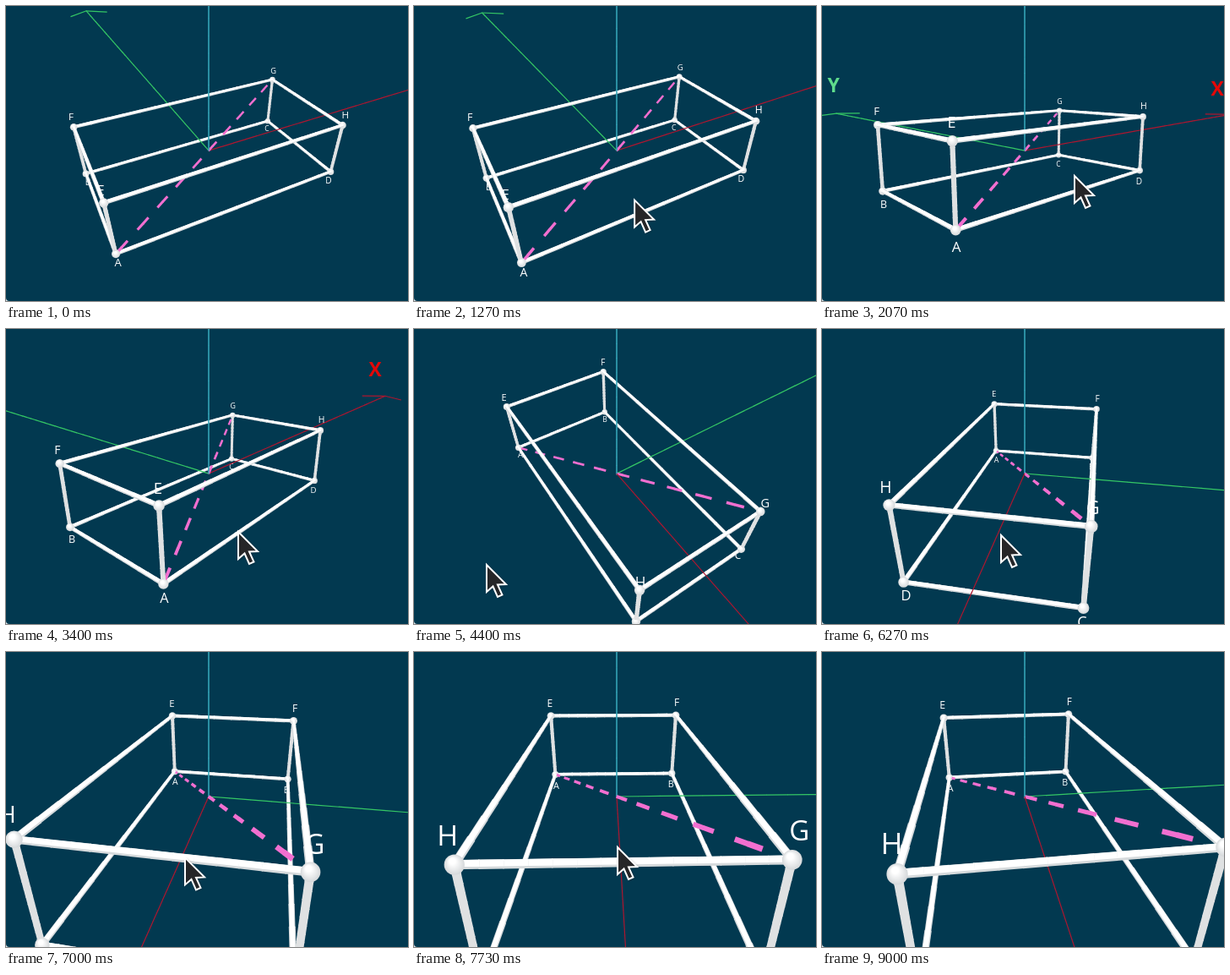
An HTML page with a canvas for the animation above (9.19 s loop, 476x349 px).

```html
<!DOCTYPE html>
<html lang="en">
<head>
<meta charset="utf-8">
<title>Orbiting a cuboid</title>
<style>
html, body { margin: 0; height: 100%; overflow: hidden; background: #023950; }
canvas { display: block; }
</style>
</head>
<body>
<canvas id="stage" width="476" height="349"></canvas>
<script>
const ctx = document.getElementById('stage').getContext('2d');
const LOOP = 9190, START = 730, END = 9000, STEP = (END - START) / 124;
const CX = 240, CY = 171, FOCAL = 425.5;

// time, azimuth, elevation, distance, cursor x, cursor y
const KEYS = [
  [730, 242.7, 36, 6.27, 255, 233],
  [1000, 242.2, 36, 5.96, 257, 232],
  [1600, 237, 32, 5.96, 270, 224],
  [2064, 226.6, 10.7, 5.96, 299, 201],
  [2530, 224, 11.5, 5.96, 297, 206],
  [3398, 220, 21.6, 5.96, 275, 240],
  [3530, 222, 23, 5.96, 270, 243],
  [4398, 326.7, 48.5, 5.95, 86, 279],
  [5330, 372, 34, 5.66, 39, 270],
  [5600, 380, 28, 5.42, 41, 262],
  [6265, 370.9, 25.6, 5.42, 212, 244],
  [6400, 370.9, 25.5, 5.42, 212, 244],
  [7180, 370.5, 24.9, 4.15, 212, 243],
  [7732, 358.6, 24.9, 4.15, 241, 231],
  [8130, 352.2, 24.8, 4.15, 257, 233],
  [8300, 352.1, 24.8, 4.15, 256, 232],
  [9000, 352.1, 24.8, 4.15, 91, 15]
];

const corners = [...'ABCDEFGH'].map((name, i) => ({
  name,
  p: [i % 4 < 2 ? -2 : 2, i % 4 === 1 || i % 4 === 2 ? 1 : -1, i < 4 ? -0.5 : 0.5]
}));

// Monotone cubic interpolation of one key column
function sample(t, col) {
  const last = KEYS.length - 1;
  if (t <= KEYS[0][0]) return KEYS[0][col];
  if (t >= KEYS[last][0]) return KEYS[last][col];
  const i = KEYS.findIndex(k => k[0] > t) - 1;
  const slope = j => j < 0 || j >= last ? 0
    : (KEYS[j + 1][col] - KEYS[j][col]) / (KEYS[j + 1][0] - KEYS[j][0]);
  const tangent = j => {
    const a = slope(j - 1), b = slope(j);
    return a * b <= 0 ? 0 : 2 * a * b / (a + b);
  };
  const h = KEYS[i + 1][0] - KEYS[i][0], u = (t - KEYS[i][0]) / h, v = 1 - u;
  return KEYS[i][col] * (1 + 2 * u) * v * v + KEYS[i + 1][col] * u * u * (3 - 2 * u)
    + h * u * v * (tangent(i) * v - tangent(i + 1) * u);
}

const mix = (a, b, k) => a.map((v, i) => v + (b[i] - v) * k);

function makeCamera(azimuth, elevation, distance) {
  const a = azimuth * Math.PI / 180, e = elevation * Math.PI / 180;
  const sa = Math.sin(a), ca = Math.cos(a), se = Math.sin(e), ce = Math.cos(e);
  const nearness = ([x, y, z]) => (x * ca + y * sa) * ce + z * se;
  const project = p => {
    const [x, y, z] = p, near = nearness(p), s = FOCAL / (distance - near);
    return {
      x: CX + (y * ca - x * sa) * s,
      y: CY + ((x * ca + y * sa) * se - z * ce) * s,
      s, near
    };
  };
  return { project, nearness, distance };
}

function stroke(a, b, width, color, extend = 0, dy = 0) {
  const len = Math.hypot(b.x - a.x, b.y - a.y) || 1;
  const ex = (b.x - a.x) / len * extend, ey = (b.y - a.y) / len * extend;
  ctx.strokeStyle = color;
  ctx.lineWidth = width;
  ctx.beginPath();
  ctx.moveTo(a.x - ex, a.y - ey + dy);
  ctx.lineTo(b.x + ex, b.y + ey + dy);
  ctx.stroke();
}

function drawScene(camera) {
  const items = [];
  const add = (near, draw) => items.push({ near, draw });

  function pieces(from, to, count, draw) {
    for (let i = 0; i < count; i++) {
      const a = camera.project(mix(from, to, i / count));
      const b = camera.project(mix(from, to, (i + 1) / count));
      add((a.near + b.near) / 2, () => draw(a, b));
    }
  }

  function tube(from, to) {
    const upright = from[2] !== to[2];
    pieces(from, to, 14, (a, b) => {
      const w = (a.s + b.s) / 2 * 0.056;
      stroke(a, b, w, upright ? '#dfe1e2' : '#d6dadc', 0.6);
      if (!upright) stroke(a, b, w * 0.72, '#fff', 0.6, -w * 0.12);
    });
  }

  function ball(p) {
    const { x, y, s, near } = camera.project(p), r = s * 0.06;
    add(near + 0.05, () => {
      const shade = ctx.createRadialGradient(x - r * 0.2, y - r * 0.35, r * 0.3, x, y, r);
      shade.addColorStop(0, '#fff');
      shade.addColorStop(1, '#d5d8da');
      ctx.fillStyle = shade;
      ctx.beginPath();
      ctx.arc(x, y, r, 0, 7);
      ctx.fill();
    });
  }

  function label(text, p, size, color, weight) {
    const { x, y, s, near } = camera.project(p);
    if (s <= 0) return;
    add(near, () => {
      const px = s * size;
      ctx.font = `${weight} ${px}px "Open Sans", sans-serif`;
      ctx.fillStyle = color;
      ctx.fillText(text, x, y + px * 0.36);
    });
  }

  function axis(dir, color, width) {
    const near = camera.nearness(dir);
    const length = near > 0 ? Math.min(10, (camera.distance - 0.2) / near) : 10;
    const line = (a, b) => stroke(a, b, width, color, 0.2);
    pieces([0, 0, 0], dir.map(v => v * length), 40, line);
    if (length < 10 || dir[2]) return;
    const tip = dir.map(v => v * 10);
    for (const side of [-0.65, 0.65]) {
      pieces(tip, [dir[0] * 9.5 + dir[1] * side, dir[1] * 9.5 + dir[0] * side, 0], 1, line);
    }
  }

  axis([1, 0, 0], '#ad1730', 1.2);
  axis([0, 1, 0], '#35c765', 1.2);
  axis([0, 0, 1], '#35a5b8', 1.6);
  label('X', [10, 0.5, 0.9], 0.7, '#e30808', 'bold');
  label('Y', [0, 10, 1], 0.7, '#5fdc8c', 'bold');

  for (let i = 0; i < 4; i++) {
    const j = (i + 1) % 4;
    for (const [m, n] of [[i, j], [i + 4, j + 4], [i, i + 4]]) tube(corners[m].p, corners[n].p);
  }
  for (const { name, p: [x, y, z] } of corners) {
    ball([x, y, z]);
    label(name, [x, y, z + Math.sign(z) * 0.2], 0.16, '#fff', 'normal');
  }

  // Dashed space diagonal from A to G
  const [start, end] = [corners[0].p, corners[6].p];
  for (let i = 0; i < 10; i++) {
    pieces(mix(start, end, i / 10), mix(start, end, i / 10 + 0.052), 2,
      (a, b) => stroke(a, b, (a.s + b.s) / 2 * 0.04, '#f36fd0', 0.3));
  }

  items.sort((a, b) => a.near - b.near).forEach(item => item.draw());
}

const arrow = new Path2D('M0 0V32L7.5 25.5L13 38L18.5 35.5L13 23.5L23 23Z');

function drawCursor(x, y) {
  ctx.save();
  ctx.translate(x, y);
  ctx.shadowColor = 'rgba(0,0,0,.45)';
  ctx.shadowBlur = 3;
  ctx.shadowOffsetX = ctx.shadowOffsetY = 1;
  ctx.fillStyle = '#fff';
  ctx.fill(arrow);
  ctx.shadowColor = 'transparent';
  ctx.fillStyle = '#262628';
  ctx.fill(arrow);
  ctx.lineWidth = 2;
  ctx.strokeStyle = '#fff';
  ctx.stroke(arrow);
  ctx.restore();
}

function render(now) {
  const time = now % LOOP;
  const step = Math.floor((Math.min(time, END) - START) / STEP + 0.1);
  const t = START + Math.max(0, step) * STEP;

  ctx.fillStyle = '#023950';
  ctx.fillRect(0, 0, 476, 349);
  ctx.textAlign = 'center';
  drawScene(makeCamera(sample(t, 1), sample(t, 2), sample(t, 3)));

  if (time >= 130 && time < END) {
    if (time < 270) drawCursor(113, 20);
    else if (time < 400) drawCursor(190, 130);
    else drawCursor(sample(t, 4), sample(t, 5));
  }

  // Rounded lower left corner
  ctx.fillStyle = '#dfe6ea';
  ctx.beginPath();
  ctx.moveTo(0, 345);
  ctx.quadraticCurveTo(0, 349, 4, 349);
  ctx.lineTo(0, 349);
  ctx.fill();
  requestAnimationFrame(frame);
}

function frame() {
  render(performance.now());
}
frame();
</script>
</body>
</html>
```
